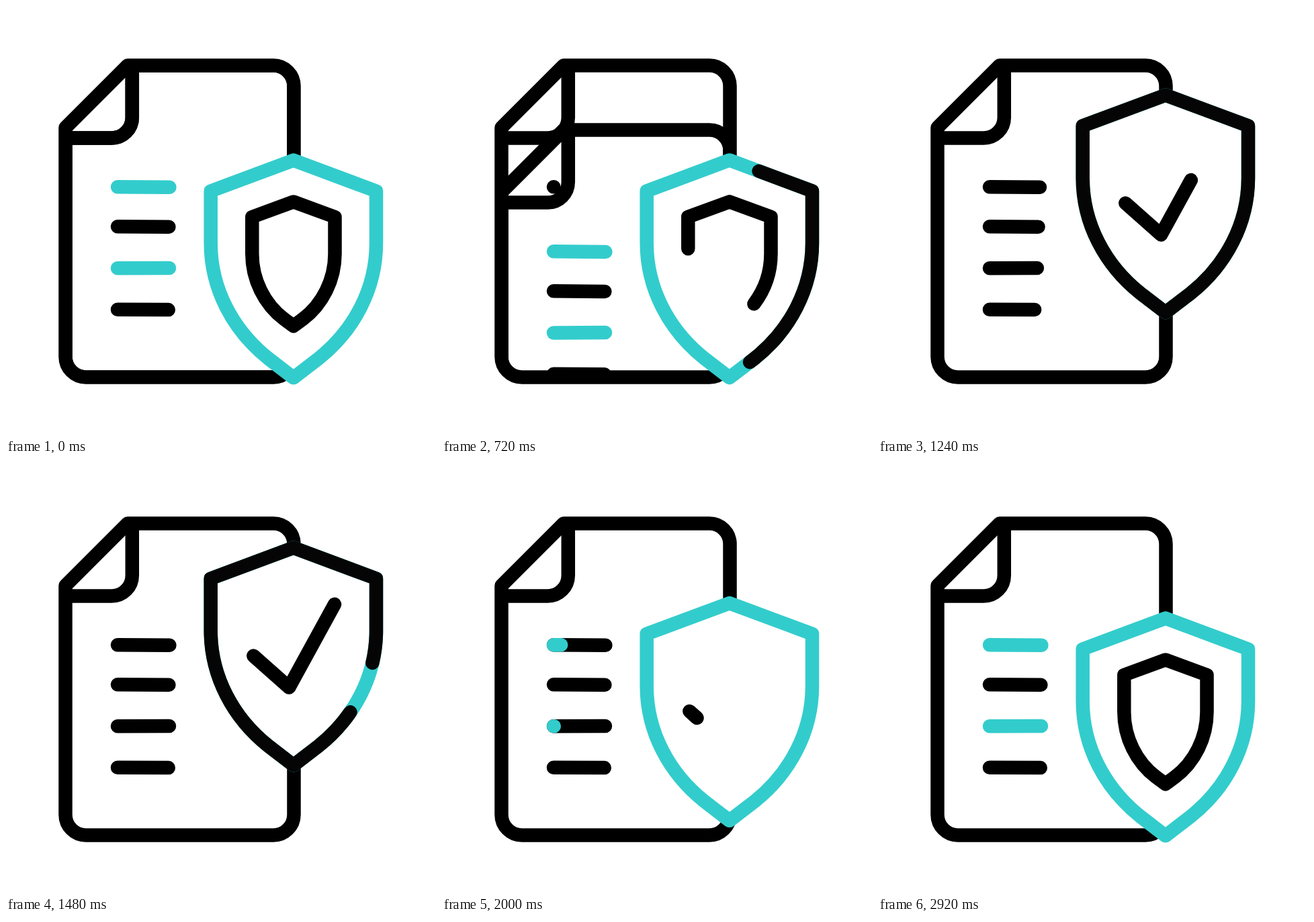
Write an HTML page that moves like this. It is 640 by 640 pixels and loops after 3000 ms.

```html
<!DOCTYPE html>
<html lang="en">
<head>
<meta charset="utf-8">
<title>Protected document</title>
<style>
  html, body { margin: 0; width: 100%; height: 100%; overflow: hidden; background: #fff; }
  svg { display: block; width: 100%; height: 100%; }
  path { fill: none; stroke: #000; stroke-width: 20.5; stroke-linecap: round; stroke-linejoin: round; }
  .fill { fill: #fff; }
  .teal { stroke: #3cc; }
  .ink { stroke: #050505; }
</style>
</head>
<body>
<svg viewBox="0 0 640 640">
  <defs>
    <path id="page" d="M181 88.5H398a30.5 30.5 0 0 1 30.5 30.5V522a30.5 30.5 0 0 1 -30.5 30.5H119a30.5 30.5 0 0 1 -30.5 -30.5V181Z"/>
    <path id="flap" d="M187.8 90V166a30.5 30.5 0 0 1 -30.5 30.5H90"/>
    <path id="l0" pathLength="100" d="M166 269.2L243.4 269.8"/>
    <path id="l1" pathLength="100" d="M166 328.2L242.4 328.8"/>
    <path id="l2" pathLength="100" d="M166 390.3L243 390"/>
    <path id="l3" pathLength="100" d="M166 451.7L241.8 452.1"/>
    <clipPath id="sheet"><use href="#page"/></clipPath>
  </defs>

  <use href="#flap"/>
  <g id="lines"></g>

  <g clip-path="url(#sheet)">
    <g id="old">
      <use href="#page" style="fill:#fff"/>
      <use href="#flap"/>
      <path class="teal" d="M166 269.2L243.4 269.8M166 390.3L243 390"/>
      <path d="M166 328.2L242.4 328.8M166 451.7L241.8 452.1"/>
    </g>
  </g>
  <use href="#page"/>

  <g id="shield">
    <path class="fill teal" id="rim"/>
    <path class="ink" id="rimInk" pathLength="100"/>
    <path id="core" pathLength="100"/>
    <path id="check" pathLength="100" d="M368.3 390.5L421.3 437.5L489 313.8"/>
  </g>
</svg>
<script>
  const LOOP = 3000, STEP = 40;
  const $ = id => document.getElementById(id);
  const ramp = (t, a, b) => Math.min(1, Math.max(0, (t - a) / (b - a)));
  const smooth = (t, a, b) => { const s = ramp(t, a, b); return s * s * (3 - 2 * s); };
  const inOut = (s, p) => s < .5 ? 2 ** (p - 1) * s ** p : 1 - 2 ** (p - 1) * (1 - s) ** p;

  // Shield outline, clockwise from the apex
  $('rim').setAttribute('d', 'M427.9 229.6L551 275.5V353C551 421 517.8 483 464.8 525L427.9 553.3L391 525C338 483 304.7 421 304.7 353V275.5Z');
  $('rimInk').setAttribute('d', $('rim').getAttribute('d'));
  $('core').setAttribute('d', 'M427.9 291.4L489.5 314V369C489.5 407 471.3 444 441.8 466L427.9 476.3L414 466C384.5 444 366.3 407 366.3 369V314Z');

  // Shows the part of a path from `start`, `len` long, both as fractions
  function trim(el, start, len) {
    el.style.display = len > 0 ? '' : 'none';
    if (len >= 1) {
      el.removeAttribute('stroke-dasharray');
    } else {
      el.setAttribute('stroke-dasharray', `${len * 100} ${(1 - len) * 100}`);
      el.setAttribute('stroke-dashoffset', -start * 100);
    }
  }

  // Open lines need a gap long enough that no second dash appears
  function grow(el, len) {
    el.style.display = len > 0 ? '' : 'none';
    el.setAttribute('stroke-dasharray', `${len * 100} 300`);
  }

  function addLine(i, cls) {
    const el = $('l' + i).cloneNode();
    el.removeAttribute('id');
    el.setAttribute('class', cls);
    return $('lines').appendChild(el);
  }

  const lines = [
    { ink: [693, 1305], teal: [1880, 2380] },
    { ink: [767, 1314] },
    { ink: [814, 1329], teal: [1970, 2468] },
    { ink: [920, 1325] }
  ];
  lines.forEach((l, i) => {
    l.inkEl = addLine(i, '');
    if (l.teal) l.tealEl = addLine(i, 'teal');
  });

  function draw(t) {
    const drop = 480 * inOut(ramp(t, 371, 1271), 3.6);
    $('old').setAttribute('transform', `translate(0 ${drop})`);
    $('old').style.display = t < 1271 ? '' : 'none';

    for (const l of lines) {
      grow(l.inkEl, smooth(t, ...l.ink));
      if (!l.teal) continue;
      grow(l.tealEl, smooth(t, ...l.teal));
      l.inkEl.style.opacity = 1 - ramp(t, 2360, 2480);
    }

    const lift = 105 * (smooth(t, 707, 1348) - smooth(t, 1625, 2160));
    $('shield').setAttribute('transform', `translate(0 ${-lift})`);

    if (t < 1400) trim($('rimInk'), .00027 * Math.max(0, t - 530), ramp(t, 530, 997));
    else trim($('rimInk'), .372, 1 - ramp(t, 1440, 1890));

    if (t < 1500) trim($('core'), .774, 1 - ramp(t, 562, 986));
    else trim($('core'), .774 - .409 * (2920 - t) / 520, ramp(t, 2019, 2920));

    grow($('check'), ramp(t, 962, 1322) - ramp(t, 1740, 2020));
  }

  function tick() {
    const t = performance.now() % LOOP;
    draw(Math.floor(t / STEP) * STEP);
    requestAnimationFrame(tick);
  }
  tick();
</script>
</body>
</html>
```
